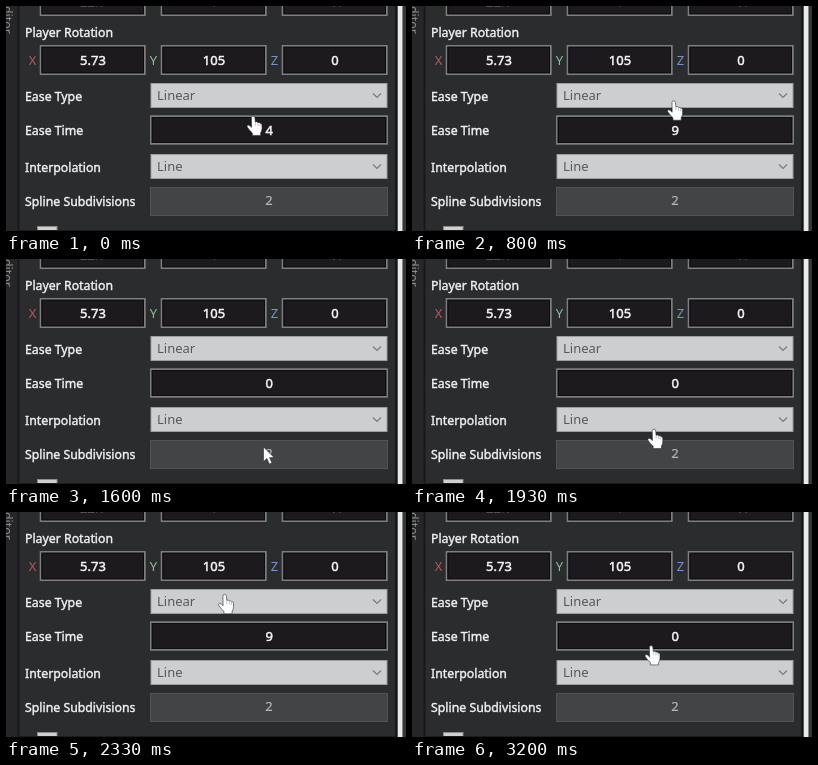
Write an HTML page that moves like this. It is 400 by 225 pixels and loops after 3.27 s.

```html
<!DOCTYPE html>
<html lang="en">
<head>
<meta charset="utf-8">
<title>Ease time drag</title>
<style>
  html, body { margin: 0; width: 100%; height: 100%; overflow: hidden; background: #2b2c2e; }
  svg { display: block; width: 400px; height: 225px; }
  text { font-family: "Noto Sans", "Open Sans", sans-serif; font-size: 13px; }
  .label { font-size: 12.3px; fill: #f2f2f2; stroke: #f2f2f2; stroke-width: .4px; }
  .value { fill: #f6f6f6; stroke: #f6f6f6; stroke-width: .5px; text-anchor: middle; }
  .axis { text-anchor: middle; }
  .option { fill: #59595b; }
  .muted { fill: #b4b6b6; stroke: #b4b6b6; stroke-width: .2px; }
  .tab { font-size: 12.4px; fill: #8b8d8e; }
</style>
</head>
<body>
<svg viewBox="0 0 400 225">
  <rect width="400" height="225" fill="#2b2c2e"/>
  <rect width="12" height="225" fill="#262527"/>
  <rect x="11.5" width="2" height="225" fill="#19191b"/>
  <text class="tab" transform="translate(-3.5 -7) rotate(90)">Editor</text>
  <g id="panel"></g>
  <rect x="31.5" y="220.5" width="19.5" height="8" fill="#d0d0d0" stroke="#8b8c8d"/>
  <rect x="13" y="224" width="377" height="1" fill="#1b1c1d"/>
  <rect x="389" width="3" height="225" fill="#151617"/>
  <rect x="391.7" width="5" height="225" fill="#e9eaea"/>
  <rect x="396.7" width="3.3" height="225" fill="#343537"/>
  <g id="cursor" stroke="#2a2a2a" stroke-width=".6" stroke-linejoin="round" fill="#fff">
    <path id="arrow" d="M0 0V14.5L3.4 11.4L5.8 17L8.4 15.9L6 10.5H10.6Z"/>
    <g id="hand">
      <path d="M-1.6 1.6Q-1.4 0 0 0Q1.7 0 1.9 1.7L2.3 6Q4 5.2 4.9 6.6Q6.4 6 7 7.3Q8.8 7 9 9V13Q8.8 15.4 7.6 16.8V19.4H-.6V17Q-3.6 14.6 -5.8 11Q-6.4 9.4 -5 9Q-3.6 9 -1.4 11.4Z"/>
      <path d="M2.3 6.2V9.6M4.9 6.8V10M7 7.6V10.4" fill="none" stroke="#999"/>
    </g>
  </g>
</svg>
<script>
const LOOP = 3270, STEP = 200 / 3, LAST = 48;
const byId = id => document.getElementById(id);
const panel = byId("panel"), cursor = byId("cursor"), arrow = byId("arrow"), hand = byId("hand");
const hotspots = [];

function add(tag, attrs, content = "") {
  const el = document.createElementNS("http://www.w3.org/2000/svg", tag);
  for (const key in attrs) el.setAttribute(key, attrs[key]);
  el.textContent = content;
  return panel.appendChild(el);
}
const text = (cls, x, y, content) => add("text", { class: cls, x, y }, content);

// A box whose border lies inside its edges
function box(x, y, w, h, fill, stroke, line = 1) {
  add("rect", {
    x: x + line / 2, y: y + line / 2, width: w - line, height: h - line,
    fill, stroke, "stroke-width": line
  });
}

function field(x, y, w, h, content) {
  hotspots.push([x, y, w, h]);
  box(x, y, w, h, "#1d1a1e", "#7d7f7f", 1.7);
  box(x + 1.7, y + 1.7, w - 3.4, h - 3.4, "none", "#0d0c0e");
  return text("value", x + w / 2 + .3, y + h / 2 + 4.5, content);
}

function dropdown(y, content) {
  hotspots.push([144.5, y, 237, 25]);
  box(144.5, y, 237, 25, "#cdced0", "#9c9d9f");
  text("option", 151, y + 16.5, content);
  add("path", { d: `M367 ${y + 10.5}l4 4l4-4`, fill: "none", stroke: "#7b7c7d", "stroke-width": 1.2 });
}

function vectorRow(y, values) {
  const axes = { X: "#b9565c", Y: "#8cbf92", Z: "#7692cb" };
  Object.keys(axes).forEach((name, i) => {
    const x = 33.7 + i * 121;
    text("axis", x - 7.2, y + 20, name).style.fill = axes[name];
    field(x, y, 106, 30, values[i]);
  });
}

vectorRow(-20, ["22.5", "6", "-15"]);
text("label", 19, 30.5, "Player Rotation");
vectorRow(39, ["5.73", "105", "0"]);
text("label", 19, 94.5, "Ease Type");
dropdown(77, "Linear");
text("label", 19, 129, "Ease Time");
const easeTime = field(144, 109.3, 238, 29.4, "4");
text("label", 19, 165.5, "Interpolation");
dropdown(148, "Line");
text("label", 19, 200, "Spline Subdivisions");
box(144, 181, 238, 29, "#434446", "#525354");
text("value muted", 263, 199.3, "2");

// Rests and turning points of the pointer: time, x, y
const turns = [
  [0, 247, 110], [267, 262.5, 118], [600, 262, 124], [1050, 261, 54],
  [1760, 257, 208], [2180, 216, 106], [2700, 228, -7], [3150, 239, 133.5]
];
const GRAB = 267, SECOND_GRAB = 1760;

function pointer(t) {
  const next = turns.findIndex(turn => turn[0] > t);
  if (next < 0) return turns.at(-1).slice(1);
  const [t0, x0, y0] = turns[next - 1], [t1, x1, y1] = turns[next];
  const u = (t - t0) / (t1 - t0), s = u * u * (3 - 2 * u);
  return [x0 + (x1 - x0) * s, y0 + (y1 - y0) * s];
}

// The number grows with the height above the point where the drag began
function dragged(t) {
  const y = pointer(Math.max(t, GRAB))[1];
  const [zero, pixels] = t < SECOND_GRAB ? [142, 5] : [124, 4.4];
  return Math.max(0, Math.floor((zero - y) / pixels));
}

function draw(now) {
  const t = STEP * Math.min(LAST, Math.floor((now % LOOP + 4) / STEP));
  const [x, y] = pointer(t);
  const over = hotspots.some(([l, top, w, h]) => x >= l && x <= l + w && y >= top && y <= top + h);
  cursor.setAttribute("transform", `translate(${x.toFixed(2)} ${y.toFixed(2)})`);
  hand.style.display = over ? "" : "none";
  arrow.style.display = over ? "none" : "";
  easeTime.textContent = dragged(t);
}

const start = performance.now();
function tick() {
  draw(performance.now() - start);
  requestAnimationFrame(tick);
}
tick();
</script>
</body>
</html>
```
